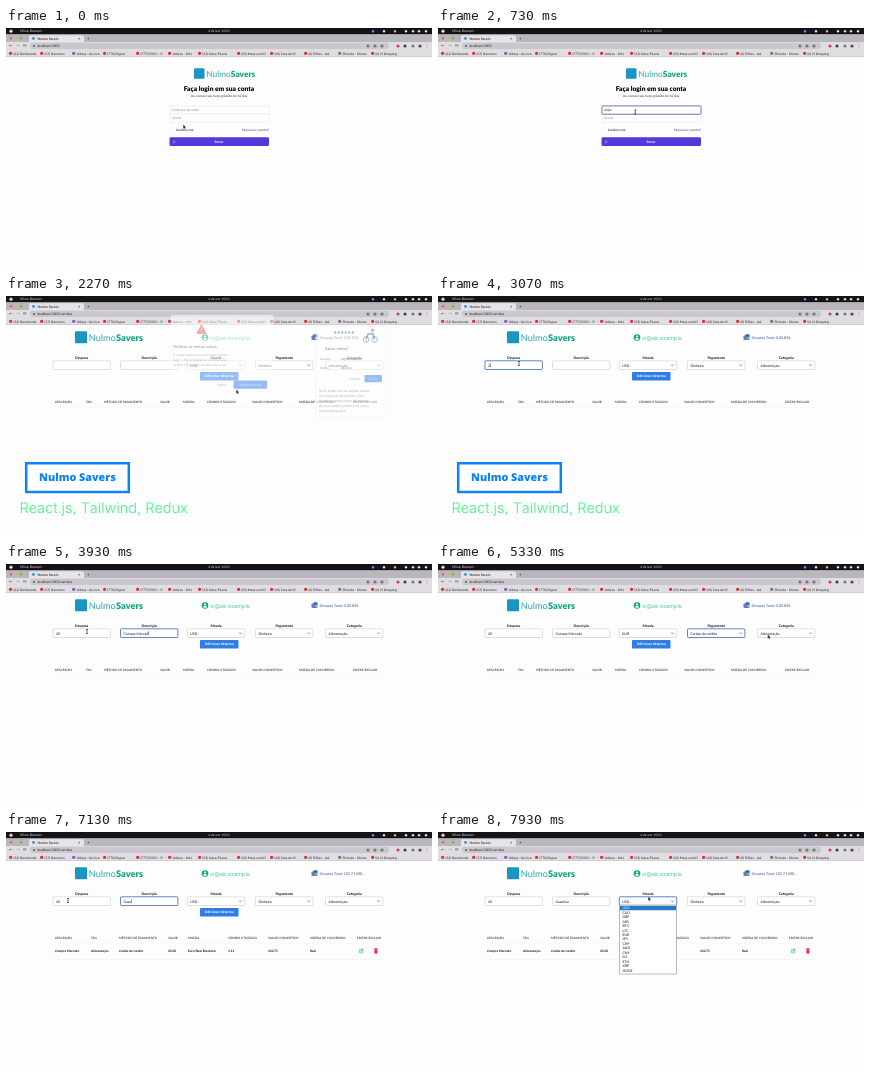
These frames come from a looping animation (426x240 px, 8000 ms). An HTML page with a canvas:

```html
<!DOCTYPE html>
<html lang="pt-BR">
<head>
<meta charset="utf-8">
<title>Nulmo Savers</title>
<style>
html, body { margin: 0; width: 100%; height: 100%; overflow: hidden; background: #fff; }
canvas { display: block; width: 426px; height: 240px; }
</style>
</head>
<body>
<canvas id="stage"></canvas>
<script>
const LOOP = 8000, STEP = 1000 / 15;
const BRAND = ["Nulmo", "Savers"], EMAIL = "oi@ab.example";
const BLUE = "#2f7de9", INK = "#111", GREEN = "#12a67c", CAPTION_BLUE = "#0f82f5";
const canvas = document.getElementById("stage");
const ctx = canvas.getContext("2d");
const ratio = window.devicePixelRatio || 1;
canvas.width = 426 * ratio;
canvas.height = 240 * ratio;
ctx.scale(ratio, ratio);
ctx.textRendering = "geometricPrecision";

const clamp = v => Math.max(0, Math.min(1, v));
const progress = (t, from, to) => clamp((t - from) / (to - from));
const easeOut = p => 1 - (1 - p) ** 3;
const easeInOut = p => p * p * (3 - 2 * p);
const within = (t, from, to) => t >= from && t < to;
const typed = (word, t, start, pace) => word.slice(0, Math.max(0, Math.floor((t - start) / pace)));

function rect(x, y, w, h, fill, stroke, radius = 0, line = 0.6) {
  ctx.beginPath();
  ctx.roundRect(x, y, w, h, radius);
  if (fill) { ctx.fillStyle = fill; ctx.fill(); }
  if (stroke) { ctx.strokeStyle = stroke; ctx.lineWidth = line; ctx.stroke(); }
}

function dot(x, y, r, fill, stroke) {
  ctx.beginPath();
  ctx.arc(x, y, r, 0, 7);
  if (fill) { ctx.fillStyle = fill; ctx.fill(); }
  if (stroke) { ctx.strokeStyle = stroke; ctx.lineWidth = 0.9; ctx.stroke(); }
}

function path(points, stroke, line = 0.6, fill) {
  ctx.beginPath();
  points.forEach(([x, y]) => ctx.lineTo(x, y));
  if (fill) { ctx.closePath(); ctx.fillStyle = fill; ctx.fill(); }
  if (stroke) { ctx.strokeStyle = stroke; ctx.lineWidth = line; ctx.stroke(); }
}

function text(str, x, y, size = 3.5, color = INK, weight = 400, align = "left", family = "Lato") {
  ctx.font = `${weight} ${size}px ${family}, sans-serif`;
  ctx.textAlign = align;
  ctx.fillStyle = color;
  ctx.fillText(str, x, y);
  return ctx.measureText(str).width;
}

function brand(x, y, size, mark) {
  rect(x, y, mark, mark, "#1795c4", null, 1);
  const left = x + mark + 1.8, base = y + mark * 0.84;
  const width = text(BRAND[0], left, base, size, "#2aa9b5", 400);
  text(BRAND[1], left + width + 0.2, base, size, GREEN, 900);
}

const bookmarks = [
  [3, "(22) Dominando"], [34, "(17) Documen"], [66, "Vídeos - Ao vivo"], [97, "(770) Regras"],
  [130, "(777) POO I - P"], [162, "Valores - Infin"], [192, "(23) Aulas/Fluxos"], [231, "(32) Mesa com D"],
  [264, "(10) Lista de M"], [298, "(4) Trilhas - Aul"], [332, "Primeira - Mente"], [365, "(4) JS Dropping"]
];

function drawBrowser(url) {
  rect(0, 0, 426, 6.5, "#151318");
  dot(5, 3.2, 1.6, "#ddd");
  text("Mirvo Browser", 14, 4.4, 3.4, "#ddd");
  text("4 de out  10:51", 213, 4.4, 3.2, "#ddd", 400, "center");
  [[367, "#4b9cf5"], [378, "#ddd"], [389, "#d9b45b"], [400, "#ddd"], [407, "#ddd"], [413, "#ddd"], [420, "#ddd"]]
    .forEach(([x, c]) => dot(x, 3.2, 1.2, c));

  rect(0, 6.5, 426, 7.5, "#b9b7bd");
  ["#e96058", "#f0b73e", "#60bd4e"].forEach((c, i) => dot(5 + i * 5, 10.3, 1.2, c));
  rect(23, 7.3, 55, 7, "#e6e4e8", null, 1.5);
  dot(27.5, 10.4, 1.3, "#1795c4");
  text(BRAND.join(" "), 31.5, 11.6, 3.5);
  text("×", 72, 11.7, 4);
  text("+", 81, 11.8, 4.2);

  rect(0, 14, 426, 15, "#dfdde2");
  text("←", 3, 19.3, 4.5, "#444", 400, "left", "DejaVu Sans");
  text("→", 10, 19.3, 4.5, "#888", 400, "left", "DejaVu Sans");
  text("⟳", 17, 19.3, 4.5, "#444", 400, "left", "DejaVu Sans");
  rect(24, 14.8, 359, 6.3, "#cac8ce", null, 3);
  dot(28, 18, 0.9, "#555");
  text(url, 31.5, 19.2, 3.4, "#222");
  [[362, "#777"], [369, "#777"], [376, "#777"], [392, "#c44842"], [399, "#444"], [407, "#777"], [414, "#684134"]]
    .forEach(([x, c]) => dot(x, 18, 1.6, c));
  text("⋮", 421, 19.4, 4.5, "#444", 400, "center", "DejaVu Sans");
  bookmarks.forEach(([x, label], i) => {
    dot(x + 1.6, 25.3, 1.6, i === 2 ? "#8454d8" : i === 10 ? "#777" : "#e22b2b");
    text(label, x + 4.4, 26.5, 3.25, "#222");
  });
  rect(0, 28.5, 426, 0.5, "#c5c3c8");
}

function drawLogin(t) {
  const email = typed(EMAIL, t, 560, 38);
  const secret = typed("••••••", t, 1430, 65);
  const focus = within(t, 430, 1250) ? 0 : t >= 1250 ? 1 : -1;
  brand(188, 40.3, 8.3, 10.5);
  text("Faça login em sua conta", 213, 63, 6.66, "#000", 900, "center");
  text("Ou comece seu teste gratuito de 14 dias", 213, 69.3, 3.2, "#333", 400, "center");
  rect(164, 78, 99, 8, t >= 1060 ? "#e8f0fe" : "#fff", "#e4e4ea", 1.2);
  rect(164, 86, 99, 8, "#fff", "#e4e4ea", 1.2);
  if (focus >= 0) rect(164, 77.9 + focus * 7.8, 99, 8.4, null, "#6f52b8", 1.2, 0.8);
  text(email || "Endereço de email", 166.3, 83.1, 3.3, email ? INK : "#888");
  text(secret || "Senha", 166.3, 91.2, 3.3, secret ? INK : "#888");
  rect(164.5, 99.7, 2.8, 2.8, "#fff", "#eeeef2", 0.5, 0.4);
  text("Lembrar-me", 170, 102.6, 3.3);
  text("Esqueceu a senha?", 263, 102.6, 3.3, "#463f91", 400, "right");
  rect(163.5, 109.3, 99.5, 8.7, "#4f3bd9", null, 1.3);
  rect(166.7, 113.2, 2.6, 2.1, "#8275ea", null, 0.4);
  rect(167.2, 111.8, 1.6, 2, null, "#8275ea", 0.8, 0.4);
  text("Entrar", 213, 114.9, 3.3, "#fff", 700, "center");
}

const currencies = "USD CAD GBP ARS BTC LTC EUR JPY CHF AUD CNY ILS ETH XRP DOGE".split(" ");
const payments = ["Dinheiro", "Cartão de crédito", "Cartão de débito"];
const fieldLeft = [47, 114.5, 181.3, 249.5, 319.5];
const fieldNames = ["Despesa", "Descrição", "Moeda", "Pagamento", "Categoria"];
const headings = ["DESCRIÇÃO", "TAG", "MÉTODO DE PAGAMENTO", "VALOR", "MOEDA", "CÂMBIO UTILIZADO",
  "VALOR CONVERTIDO", "MOEDA DE CONVERSÃO", "EDITAR/EXCLUIR"];
const emptyColumns = [49, 80, 98, 154, 177, 201, 246, 293, 347];
const filledColumns = [49, 85, 113, 162, 182, 222, 262, 304, 351];
const expense = ["Compra Mercado", "Alimentação", "Cartão de crédito", "20.00", "Euro/Real Brasileiro", "5.14", "102.71", "Real"];

function drawOptions(options, x, selected) {
  rect(x, 73, 57, options.length * 4.47 + 2, "#fff", "#777", 0, 0.5);
  options.forEach((option, i) => {
    const y = 73.7 + i * 4.47;
    if (i === selected) rect(x + 0.4, y, 56.2, 4.5, "#2b78c5");
    text(option, x + 3, y + 3.5, 3.5, i === selected ? "#fff" : INK);
  });
}

function focusedField(t) {
  if (t < 2750) return -1;
  if (t < 3200) return 0;
  if (t < 4230) return 1;
  if (t < 4780) return 2;
  if (t < 5750) return 3;
  if (t < 6050) return -1;
  if (t < 6780) return 0;
  return t < 7750 ? 1 : 2;
}

function drawWallet(t) {
  const added = t >= 5790;
  brand(69, 35.3, 9.2, 12);
  dot(199, 41.5, 3.3, GREEN);
  dot(199, 40.5, 1.1, "#fff");
  rect(197.2, 42.1, 3.6, 1.6, "#fff", null, 0.8);
  text(EMAIL, 204, 43.5, 5.6, "#28b789", 300, "left", "Inter");
  rect(305.5, 39.5, 6, 4.5, "#5c84bd", null, 0.8);
  rect(307.5, 38.2, 4, 2.4, "#3964a4", null, 0.5);
  dot(310.3, 42, 0.7, "#fff");
  text(`Despesa Total: ${added ? "102.71" : "0.00"} BRL`, 313.5, 43, 3.7, "#31588f");

  const values = [
    added ? typed("40", t, 6100, 200) : typed("20", t, 2850, 130),
    added ? typed("Gasolina", t, 6800, 70) : typed("Compra Mercado", t, 3200, 55),
    within(t, 4550, 5790) ? "EUR" : "USD",
    within(t, 5100, 5790) ? payments[1] : payments[0],
    "Alimentação"
  ];
  const focus = focusedField(t);
  fieldLeft.forEach((x, i) => {
    text(fieldNames[i], x + 28.7, 63, 3.5, INK, 700, "center");
    rect(x, 64.8, 57.4, 8.7, "#fff", i === focus ? "#3d68b5" : "#c9cbd2", 0.7, i === focus ? 0.8 : 0.6);
    const width = text(values[i], x + 3, 70.5, 3.5);
    if (i === focus && i < 2) rect(x + 3.3 + width, 67.3, 0.4, 4, INK);
    if (i > 1) path([[x + 51.8, 68.5], [x + 53.1, 69.9], [x + 54.4, 68.5]], "#444");
  });
  rect(194, 76, 38.5, 8.5, within(t, 5730, 5860) ? "#1f5cb5" : BLUE, null, 0.8);
  text("Adicionar despesa", 213.2, 81.4, 3.6, "#fff", 700, "center");

  const columns = added ? filledColumns : emptyColumns;
  headings.forEach((heading, i) => text(heading, columns[i], 107.3, 3.05, INK));
  rect(47, 111.3, 331, 0.4, "#f4f4f1");
  if (added) {
    expense.forEach((value, i) => text(value, columns[i], 120.2, 3.15, INK, 700));
    rect(353.2, 117.2, 3.7, 3.7, null, "#35ad82", 0.5);
    path([[354.5, 119.7], [357.5, 116.6]], "#35ad82", 0.9);
    rect(368.3, 117.2, 3.2, 4.4, "#dc3349", null, 0.6);
    rect(367.7, 116.1, 4.4, 0.7, "#dc3349");
    rect(47, 127, 331, 0.4, "#ededeb");
  }
  if (within(t, 4250, 4550)) drawOptions(currencies, 181.5, Math.round(6 * progress(t, 4300, 4480)));
  if (within(t, 4800, 5100)) drawOptions(payments, 249.7, t > 4900 ? 1 : 0);
  if (t >= 7810) drawOptions(currencies, 181.5, 0);
}

function drawPasswordDialogs(t) {
  if (!within(t, 2000, 2334)) return;
  ctx.save();
  ctx.globalAlpha = 1 - progress(t, 2200, 2334);
  rect(165, 19, 102, 76, "#fff", "#eee", 1.5, 0.4);
  path([[195.5, 28], [201, 38], [190, 38]], null, 0, "#d86557");
  rect(195.1, 31.5, 0.8, 4, "#fff");
  text("Verificar as senhas salvas", 167, 52.3, 4, "#333");
  ["A senha usada neste site pode não ser", "segura. Recomendamos verificar suas", "senhas e criar uma combinação nova."]
    .forEach((line, i) => text(line, 167, 60 + i * 5, 3.3, "#777"));
  text("Fechar", 216, 89.7, 3.4, BLUE, 400, "center");
  rect(227.5, 84.5, 33.5, 8.3, BLUE, null, 1);
  text("Verificar senha", 244.2, 89.8, 3.6, "#fff", 700, "center");

  rect(309.5, 30, 70.5, 91, "#fff", "#ddd", 1.5, 0.4);
  for (let i = 0; i < 6; i++) dot(329 + i * 3.6, 36.5, 1.2, "#4c83cb");
  dot(360, 43.5, 2.8, null, "#397895");
  dot(368.5, 43.5, 2.8, null, "#397895");
  path([[360, 43.5], [362, 38], [367, 37.5], [368.5, 43.5]], "#397895", 1.6);
  dot(366.5, 34.3, 1.7, "#bd765c");
  text("Salvar senha?", 319, 54.2, 4, "#222");
  text("Usuário", 314, 64, 3.2, "#444");
  text(EMAIL, 335, 64, 3.2, "#222");
  text("Senha", 314, 72.5, 3.2, "#444");
  text("••••••", 335, 72.5, 3.2, "#222");
  text("Nunca", 349, 84, 3.3, BLUE, 400, "center");
  rect(358.5, 79, 17.5, 7.3, BLUE, null, 1);
  text("Salvar", 367.2, 83.9, 3.4, "#fff", 400, "center");
  ["Você pode usar as senhas salvas", "em qualquer dispositivo. Elas", "ficam no gerenciador de senhas", "da sua conta e podem ser vistas", "neste navegador."]
    .forEach((line, i) => text(line, 313, 96 + i * 5, 3.6, "#60708e"));
  ctx.restore();
}

function drawCaption(t) {
  const open = Math.min(easeOut(progress(t, 1130, 1860)), 1 - easeInOut(progress(t, 3130, 3650)));
  if (open > 0.01) {
    const half = 51.3 * open;
    ctx.save();
    ctx.beginPath();
    ctx.rect(71.5 - half, 166, half * 2, 32);
    ctx.clip();
    rect(71.5 - half, 166, half * 2, 32, "#fff");
    // Shrinks the size when the condensed face is unavailable.
    const title = BRAND.join(" ");
    const face = size => `900 condensed ${size}px "Open Sans", Roboto, sans-serif`;
    ctx.font = face(18.5);
    const size = 18.5 * Math.min(1, 77 / ctx.measureText(title).width);
    ctx.font = face(size);
    ctx.textAlign = "center";
    ctx.fillStyle = CAPTION_BLUE;
    ctx.fillText(title, 71.5, 181.5 + size * 0.357);
    ctx.restore();
    rect(71.5 - half, 167.3, half * 2, 28.8, null, CAPTION_BLUE, 0, 2.5);
  }
  let x = 13.5;
  [..."React.js, Tailwind, Redux"].forEach((letter, i) => {
    ctx.save();
    ctx.globalAlpha = progress(t, 950 + i * 15, 1080 + i * 15) * (1 - progress(t, 3130 + i * 12, 3260 + i * 12));
    x += text(letter, x, 217, 14.5, "#3df57e", 300, "left", "Inter");
    ctx.restore();
  });
}

const pointerStops = [
  [0, 178, 98], [430, 200, 83], [1000, 195, 84], [1300, 193, 91], [1850, 193, 91], [2200, 231, 95],
  [2400, 231, 95], [2750, 81, 67], [3950, 81, 67], [4200, 211, 67], [4300, 211, 67], [4480, 195, 103],
  [4590, 195, 103], [4770, 279, 68], [4900, 270, 80], [5100, 270, 80], [5300, 330.5, 72], [5450, 330.5, 72],
  [5700, 213, 80], [5830, 213, 80], [6050, 62, 68], [7450, 62, 68], [7730, 211, 66], [8000, 211, 66]
];

function drawPointer(t, loggedIn) {
  const next = pointerStops.findIndex(stop => stop[0] > t);
  const [from, x0, y0] = pointerStops[next - 1], [to, x1, y1] = pointerStops[next];
  const p = easeInOut(progress(t, from, to));
  const x = x0 + (x1 - x0) * p, y = y0 + (y1 - y0) * p;
  const overInput = loggedIn ? x < 172 && within(y, 65, 74) : within(y, 78, 94);
  ctx.save();
  ctx.translate(x - 0.8, y - 1.5);
  if (overInput) path([[0, 0], [1.6, 0], [0.8, 0], [0.8, 4], [0, 4], [1.6, 4]], INK, 0.6);
  else path([[0, 0], [0, 4.2], [1, 3.4], [1.7, 4.8], [2.4, 4.4], [1.7, 3.1], [3, 3]], "#fff", 0.3, INK);
  ctx.restore();
}

function draw(now) {
  const t = Math.floor((now % LOOP + 5) / STEP) * STEP % LOOP;
  const loggedIn = t >= 1900;
  rect(0, 0, 426, 240, "#fdfdfd");
  drawBrowser(loggedIn ? "localhost:3000/carteira" : "localhost:3000");
  if (loggedIn) drawWallet(t);
  else drawLogin(t);
  drawPasswordDialogs(t);
  drawPointer(t, loggedIn);
  drawCaption(t);
}

const start = performance.now();
function tick() {
  draw(performance.now() - start);
  requestAnimationFrame(tick);
}
tick();
</script>
</body>
</html>
```
